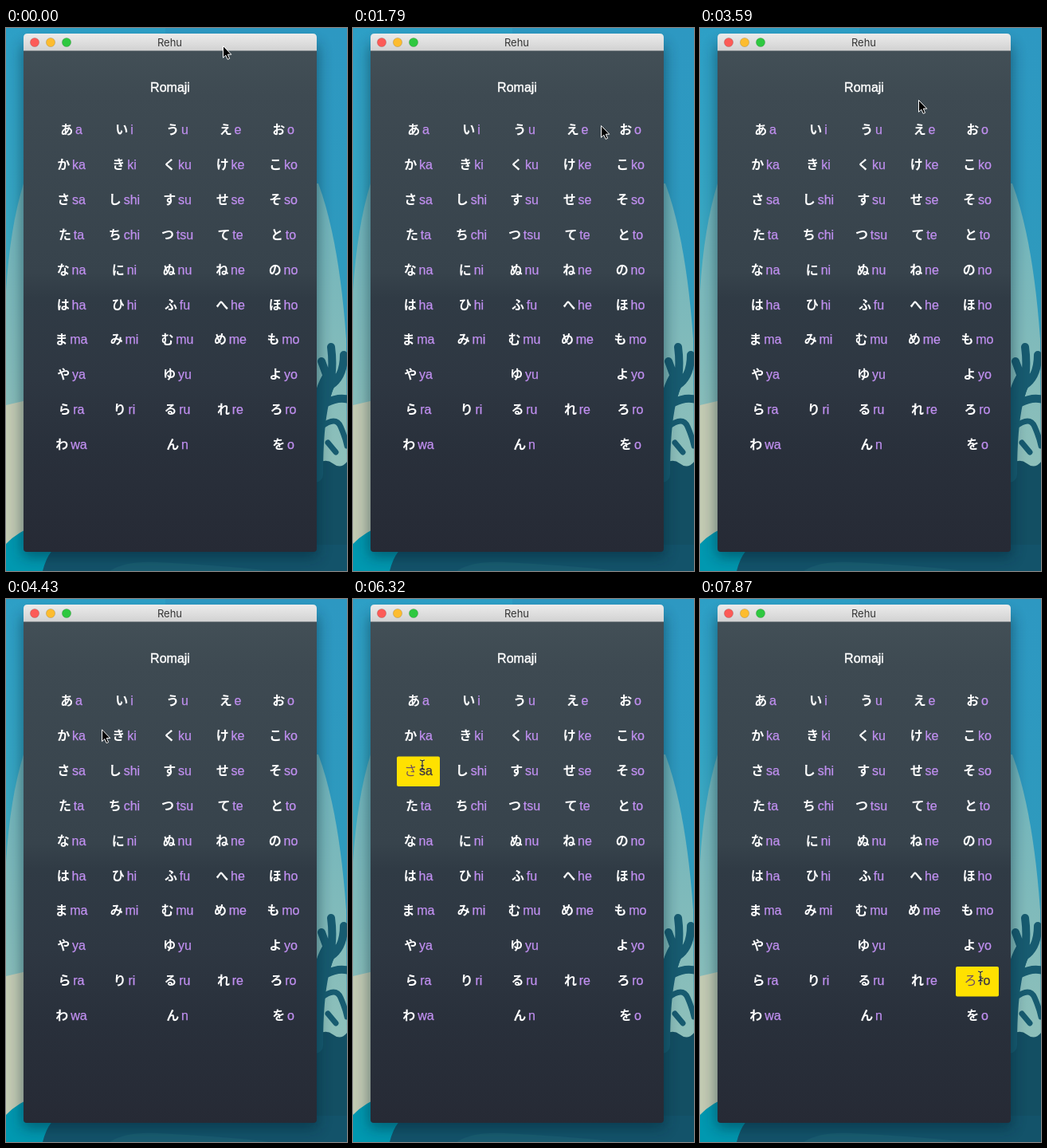
Write an HTML page that moves like this. It is 428 by 681 pixels and loops after 7990 ms.

```html
<!DOCTYPE html>
<html lang="ja">
<head>
<meta charset="utf-8">
<title>Kana table</title>
<style>
  html, body { margin: 0; width: 100%; height: 100%; overflow: hidden; background: #2d9dc2; }
  svg { display: block; width: 100vw; height: 100vh; }
  text { text-anchor: middle; font: 16px "Liberation Sans", "Noto Sans CJK JP", "Noto Sans CJK", sans-serif; }
  #cells text { fill: #c08ff0; stroke: #c08ff0; stroke-width: .25; }
  #cells .kana { font-family: "Noto Sans CJK JP", "Noto Sans CJK", sans-serif; font-weight: 700; fill: #fff; stroke: none; }
  #cells .hover .kana { fill: #ffdc00; }
  #cells .press { fill: #3c3540; stroke: #3c3540; }
  #cells .press .kana { fill: #704f62; font-weight: 400; }
</style>
</head>
<body>
<svg viewBox="0 0 428 681">
  <defs>
    <linearGradient id="sky" x2="0" y2="1">
      <stop offset="0" stop-color="#2d9fc6"/>
      <stop offset=".3" stop-color="#35a5c3"/>
      <stop offset=".6" stop-color="#4badbd"/>
      <stop offset="1" stop-color="#5fb3b8"/>
    </linearGradient>
    <linearGradient id="east" x2="0" y2="1">
      <stop offset="0" stop-color="#2d98c2"/>
      <stop offset="1" stop-color="#2f9bb8"/>
    </linearGradient>
    <linearGradient id="haze" x2="0" y2="1">
      <stop offset="0" stop-color="#6fb4bc"/>
      <stop offset="1" stop-color="#8fc0ba"/>
    </linearGradient>
    <linearGradient id="panel" x2="0" y2="1">
      <stop offset="0" stop-color="#435057"/>
      <stop offset=".1" stop-color="#3e4a52"/>
      <stop offset=".45" stop-color="#37434c"/>
      <stop offset=".5" stop-color="#303b45"/>
      <stop offset=".66" stop-color="#2e3742"/>
      <stop offset=".8" stop-color="#29303b"/>
      <stop offset="1" stop-color="#262a35"/>
    </linearGradient>
    <linearGradient id="bar" x2="0" y2="1">
      <stop offset="0" stop-color="#ebebeb"/>
      <stop offset="1" stop-color="#d2d2d2"/>
    </linearGradient>
    <filter id="blur" x="-20%" y="-20%" width="140%" height="140%"><feGaussianBlur stdDeviation="9"/></filter>
  </defs>

  <rect width="428" height="681" fill="url(#sky)"/>
  <rect x="200" width="228" height="600" fill="url(#east)"/>
  <path d="M0 330Q5 250 22 195H392Q418 265 427 390L428 560H0z" fill="url(#haze)"/>
  <path d="M0 473L30 466V681H0z" fill="#c3cbb3"/>
  <path d="M0 647Q14 632 40 622H200V681H0z" fill="#0098b0"/>
  <path d="M385 550Q400 538 410 546T428 544V681H385z" fill="#134f63"/>
  <g id="leaves" fill="none" stroke="#175b70" stroke-linecap="round">
    <path d="M388 560Q388 470 406 440" stroke-width="20"/>
    <path d="M394 480Q414 445 408 400M404 450Q424 440 424 410M402 470Q418 462 430 466M396 418L404 440" stroke-width="10"/>
    <path d="M396 500Q414 486 420 500T428 524M404 520L414 532" stroke-width="7"/>
  </g>
  <path d="M46 681Q54 650 72 648H428V681z" fill="#13536a"/>
  <path d="M130 681Q150 668 190 670T270 675T330 681z" fill="#195c70"/>

  <rect x="20" y="20" width="372" height="644" rx="6" fill="#022332" opacity=".48" filter="url(#blur)"/>
  <rect x="22" y="20" width="368" height="637" rx="4" fill="url(#panel)"/>
  <path d="M22 28.5V12Q22 7 27 7H385Q390 7 390 12V28.5z" fill="url(#bar)"/>
  <g stroke="#000" stroke-opacity=".14">
    <circle cx="36" cy="18" r="5.6" fill="#fc5b57"/>
    <circle cx="56" cy="18" r="5.6" fill="#fdbc2f"/>
    <circle cx="76" cy="18" r="5.6" fill="#2ec840"/>
  </g>
  <text x="205.5" y="23" fill="#353535" style="font:13px Inter,Roboto,sans-serif">Rehu</text>

  <text id="mode" x="206" y="80" fill="#fff" stroke="#fff" stroke-width=".4"></text>
  <rect id="box" width="54" height="37.5" rx="2"/>
  <g id="cells"></g>

  <path id="arrow" d="M.5.5V15.3L3.8 12.2L6.2 17.4L8.6 16.3L6.3 11.2H10.8z" fill="#000" stroke="#fff"/>
  <g id="beam" fill="none">
    <path d="M-3-6Q0-6 0-4V4Q0 6-3 6M3-6Q0-6 0-4M3 6Q0 6 0 4M-2 1H2" stroke="#fff" stroke-opacity=".4" stroke-width="2.4"/>
    <path d="M-3-6Q0-6 0-4V4Q0 6-3 6M3-6Q0-6 0-4M3 6Q0 6 0 4M-2 1H2" stroke="#16181c" stroke-width="1.1"/>
  </g>
</svg>
<script>
const $ = id => document.getElementById(id);
const LOOP = 7990, PITCH = 43.9;

const hiragana = "あいうえお かきくけこ さしすせそ たちつてと なにぬねの はひふへほ まみむめも や_ゆ_よ らりるれろ わ_ん_を".split(" ");
const katakana = "アイウエオ カキクケコ カシスセソ タチツテト ナニヌネノ ハヒフヘホ マミムメモ ヤ_ユ_ヨ ラリルレロ ワ_ン_オ".split(" ");
const romaji = `a i u e o,ka ki ku ke ko,sa shi su se so,ta chi tsu te to,na ni nu ne no,ha hi fu he ho,
ma mi mu me mo,ya _ yu _ yo,ra ri ru re ro,wa _ n _ o`.split(",").map(row => row.trim().split(" "));

function add(parent, tag, attrs = {}, text = "") {
  const el = document.createElementNS("http://www.w3.org/2000/svg", tag);
  for (const key in attrs) el.setAttribute(key, attrs[key]);
  el.textContent = text;
  return parent.appendChild(el);
}

const cells = [];
hiragana.forEach((row, r) => [...row].forEach((kana, c) => {
  if (kana === "_") return;
  const text = add($("cells"), "text", { y: 133 + PITCH * r });
  add(text, "tspan", { class: "kana" }, kana);
  const reading = add(text, "tspan", { dx: 2.8 });
  cells.push({ r, c, text, reading, x: 55 + 66.5 * c, y: 109.8 + PITCH * r });
}));

// Pointer path: tick, x, y
const path = [
  [0, 272, 22], [2, 272, 22], [6, 191, 72], [7, 191, 72], [9, 209, 67], [10, 209, 67],
  [11, 216, 58], [13, 262, 18], [15, 311, 122], [17, 232, 84], [21, 222, 85], [23, 230, 80],
  [24, 230, 80], [27, 281, 91], [28, 281, 91], [30, 274, 90], [31, 272, 93], [33, 238, 100],
  [35, 176, 230], [38, 92, 130], [39, 90, 132], [40, 100, 172], [42, 176, 256], [43, 175, 222],
  [44, 160, 177], [45, 92, 184], [49, 92, 194], [50, 90, 202], [52, 87, 208], [56, 87, 208],
  [58, 105, 228], [61, 220, 350], [63, 315, 440], [64, 331, 462], [65, 350, 472], [66, 352, 473]
];

function pointer(tick) {
  const i = Math.max(1, path.findIndex(p => p[0] >= tick));
  const [t0, x0, y0] = path[i - 1], [t1, x1, y1] = path[i];
  const k = (tick - t0) / (t1 - t0);
  return [x0 + (x1 - x0) * k, y0 + (y1 - y0) * k];
}

// Ticks last 120 ms, apart from five that are 10 ms shorter
const shortTicks = [900, 5100, 5200, 5500, 7600];
const tickAt = t => Math.min(66, Math.floor((t + 10 * shortTicks.filter(s => t >= s).length) / 120));

function draw(tick) {
  const [x, y] = pointer(tick);
  const kata = tick >= 19 && tick < 29;
  const pressed = tick >= 52 && tick <= 56 || tick === 66;
  const state = pressed ? "press" : "hover";
  let hit = null;

  $("mode").textContent = kata ? "Katakana" : "Romaji";
  for (const cell of cells) {
    const { r, c, text, reading } = cell;
    const over = x >= cell.x && x < cell.x + 54 && y >= cell.y && y < cell.y + 37.5;
    if (over) hit = cell;
    text.setAttribute("x", kata ? 79.5 + 63.25 * c : 82 + 66.5 * c);
    text.setAttribute("class", over ? state : "");
    reading.style.fontFamily = kata ? '"Noto Sans CJK JP", "Noto Sans CJK", sans-serif' : "";
    reading.textContent = (kata ? katakana : romaji)[r][c];
  }

  $("box").style.display = hit ? "" : "none";
  if (hit) {
    $("box").setAttribute("x", hit.x);
    $("box").setAttribute("y", hit.y);
    $("box").setAttribute("fill", pressed ? "#ffe100" : "#ffffff0d");
  }

  const onTitle = Math.abs(x - 206) < 34 && Math.abs(y - 74.5) < 11;
  const onText = hit && Math.abs(x - hit.x - 27) < 19 && Math.abs(y - hit.y - 17.7) < 11;
  for (const id of ["arrow", "beam"]) {
    $(id).style.display = (id === "beam") === !!(onTitle || onText) ? "" : "none";
    $(id).setAttribute("transform", `translate(${x} ${y})`);
  }
}

let last = -1;
function frame() {
  const tick = tickAt(performance.now() % LOOP);
  if (tick !== last) draw(last = tick);
  requestAnimationFrame(frame);
}
frame();
</script>
</body>
</html>
```
